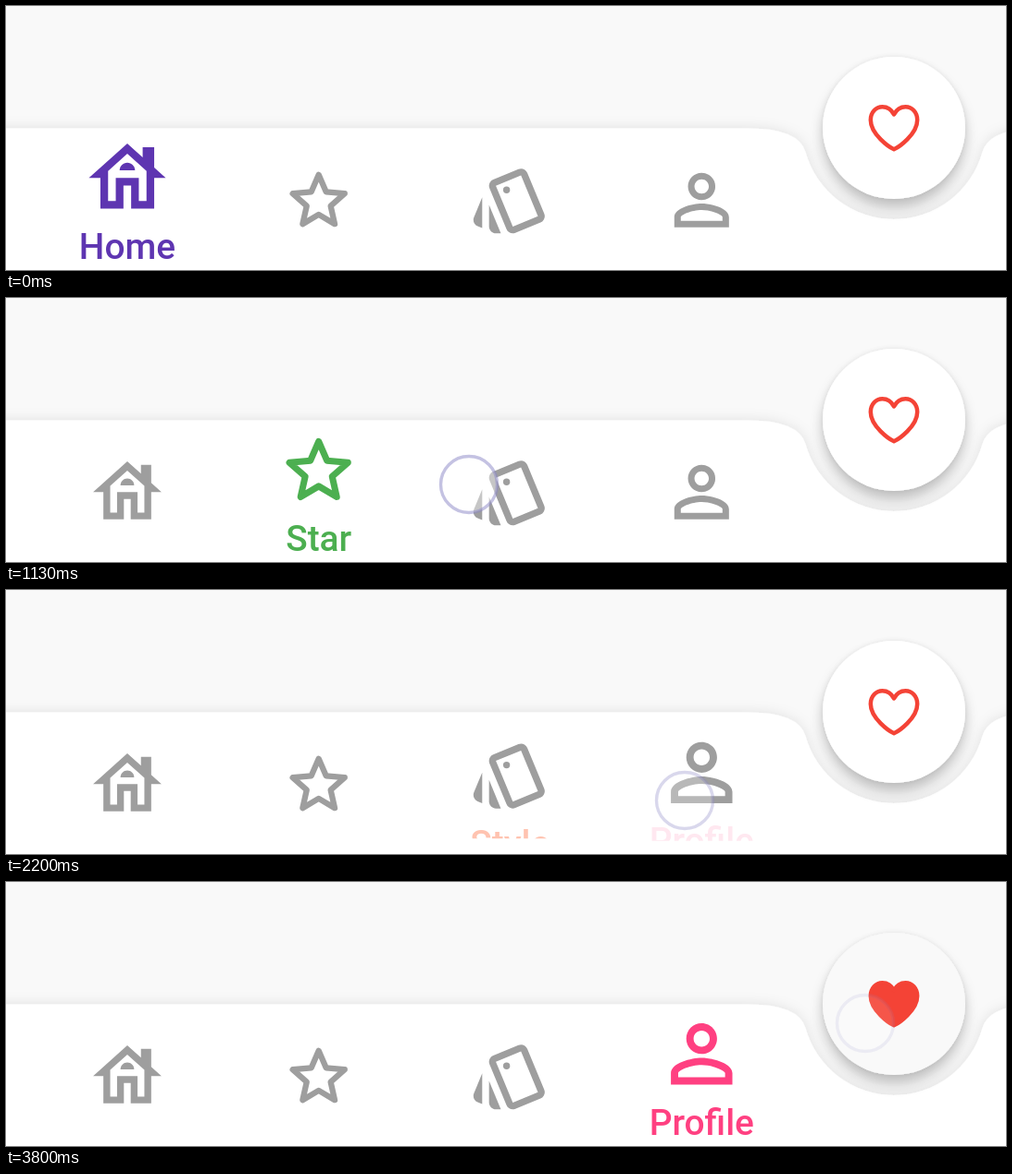
Write an HTML page that moves like this. It is 1080 px wide and 286 px high and loops after 3.87 s.

```html
<!DOCTYPE html>
<html lang="en">
<head>
<meta charset="utf-8">
<title>Bottom navigation bar</title>
<style>
  /* lift, label alpha, icon tint and icon size, each 0 to 1 */
  @property --lift  { syntax: "<number>"; inherits: true; initial-value: 0; }
  @property --alpha { syntax: "<number>"; inherits: true; initial-value: 0; }
  @property --tint  { syntax: "<number>"; inherits: true; initial-value: 0; }
  @property --big   { syntax: "<number>"; inherits: true; initial-value: 0; }

  html, body { margin: 0; width: 100%; height: 100%; overflow: hidden; background: #f9f9f9; }
  svg { display: block; width: 1080px; height: 286px; }

  .item, .heart, .fab, .ring, .ring circle { animation: 3870ms linear infinite; }

  .icon {
    fill: color-mix(in srgb, var(--hue) calc(var(--tint) * 100%), #9e9e9e);
    transform: translateY(calc(210.3px - 24px * var(--lift)))
               scale(calc(3.69 + .46 * var(--big)))
               translate(-12px, -12px);
  }
  .icon .line {
    fill: none;
    stroke: color-mix(in srgb, var(--hue) calc(var(--tint) * 100%), #9e9e9e);
    stroke-width: 1.7;
    stroke-linejoin: round;
  }
  .label {
    font: 500 38.8px Roboto, sans-serif;
    text-anchor: middle;
    fill: var(--hue);
    opacity: var(--alpha);
    transform: translateY(calc(23px * (1 - var(--lift))));
    clip-path: inset(0 -4px calc(46px * (1 - var(--lift))) -4px);
  }

  .home    { --hue: #5e35b1; animation-name: home; }
  .star    { --hue: #4caf50; animation-name: star; }
  .style   { --hue: #ff6e40; animation-name: style; }
  .profile { --hue: #ff4081; animation-name: profile; }

  @keyframes home {
    0%     { --lift: 1; --alpha: 1; --tint: 1; --big: 1; }
    3.36%  { --lift: 1; --alpha: 1; --tint: 1; --big: 1; animation-timing-function: cubic-bezier(.33, 1, .68, 1); }
    3.38%  { --alpha: 1; --tint: 0; --big: 0; }
    6.46%  { --alpha: 0; }
    10.34% { --lift: 0; }
    100%   { --lift: 0; --alpha: 0; --tint: 0; --big: 0; }
  }
  @keyframes star {
    0%     { --lift: 0; --alpha: 0; --tint: 0; --big: 0; }
    3.36%  { --lift: 0; --big: 0; animation-timing-function: cubic-bezier(.33, 1, .68, 1); }
    3.38%  { --big: 1; }
    4.26%  { --alpha: 0; }
    7.62%  { --tint: 0; }
    11.89% { --lift: 1; --alpha: 1; }
    20.54% { --tint: 1; }
    29.46% { --lift: 1; --alpha: 1; --tint: 1; --big: 1; animation-timing-function: cubic-bezier(.33, 1, .68, 1); }
    29.48% { --alpha: 1; --tint: 0; --big: 0; }
    32.56% { --alpha: 0; }
    36.43% { --lift: 0; }
    100%   { --lift: 0; --alpha: 0; --tint: 0; --big: 0; }
  }
  @keyframes style {
    0%     { --lift: 0; --alpha: 0; --tint: 0; --big: 0; }
    29.46% { --lift: 0; --big: 0; animation-timing-function: cubic-bezier(.33, 1, .68, 1); }
    29.48% { --big: 1; }
    30.36% { --alpha: 0; }
    33.72% { --tint: 0; }
    37.98% { --lift: 1; --alpha: 1; }
    46.64% { --tint: 1; }
    55.04% { --lift: 1; --alpha: 1; --tint: 1; --big: 1; animation-timing-function: cubic-bezier(.33, 1, .68, 1); }
    55.06% { --alpha: 1; --tint: 0; --big: 0; }
    58.14% { --alpha: 0; }
    62.02% { --lift: 0; }
    100%   { --lift: 0; --alpha: 0; --tint: 0; --big: 0; }
  }
  @keyframes profile {
    0%     { --lift: 0; --alpha: 0; --tint: 0; --big: 0; }
    55.04% { --lift: 0; --big: 0; animation-timing-function: cubic-bezier(.33, 1, .68, 1); }
    55.06% { --big: 1; }
    55.94% { --alpha: 0; }
    59.3%  { --tint: 0; }
    63.57% { --lift: 1; --alpha: 1; }
    72.22% { --tint: 1; }
    100%   { --lift: 1; --alpha: 1; --tint: 1; --big: 1; }
  }

  .fab { fill: #fff; animation-name: press; }
  @keyframes press {
    0%, 93.02%   { fill: #fff; }
    96.38%, 100% { fill: #f9f9f9; }
  }

  .heart {
    fill: #f44336;
    stroke: #f44336;
    stroke-width: 4.5;
    stroke-linejoin: round;
    animation-name: like;
  }
  @keyframes like {
    0%, 96.37%   { fill-opacity: 0; }
    96.38%, 100% { fill-opacity: 1; }
  }

  .ring { animation-name: move; }
  .ring circle {
    fill: rgba(255, 255, 255, .42);
    stroke: rgba(143, 139, 200, .52);
    stroke-width: 3.4;
    filter: blur(.6px);
    animation-name: touch;
  }
  @keyframes move {
    0%, 10.85%      { transform: translate(344px, 206px); }
    21.96%          { transform: translate(400px, 204px); animation-timing-function: ease-out; }
    27.65%, 34.37%  { transform: translate(500px, 202px); }
    43.93%          { transform: translate(600px, 214px); animation-timing-function: ease-out; }
    49.87%, 60.21%  { transform: translate(733px, 228px); }
    82.69%          { transform: translate(772px, 205px); animation-timing-function: ease-in-out; }
    90.44%          { transform: translate(940px, 145px); animation-timing-function: ease-in-out; }
    93.02%, 100%    { transform: translate(928px, 153px); }
  }
  @keyframes touch {
    0%, 1.81%       { opacity: 0; }
    3.62%, 5.17%    { opacity: 1; }
    8.53%           { opacity: .65; }
    10.85%, 21.96%  { opacity: 0; }
    25.84%, 29.46%  { opacity: 1; }
    34.37%, 43.93%  { opacity: 0; }
    47.29%, 55.04%  { opacity: 1; }
    56.85%          { opacity: .65; }
    60.21%, 82.69%  { opacity: 0; }
    86.05%, 94.83%  { opacity: 1; }
    98.19%          { opacity: .25; }
    100%            { opacity: 0; }
  }
</style>
</head>
<body>
<svg viewBox="0 0 1080 286">
  <defs>
    <filter id="barShade" filterUnits="userSpaceOnUse" x="-60" y="60" width="1260" height="320">
      <feDropShadow dx="0" dy="0" stdDeviation="7" flood-color="#000" flood-opacity=".1"/>
    </filter>
    <filter id="fabShade" filterUnits="userSpaceOnUse" x="820" y="0" width="280" height="286">
      <feDropShadow dx="0" dy="10" stdDeviation="7" flood-color="#000" flood-opacity=".21"/>
    </filter>
    <filter id="rimShade" filterUnits="userSpaceOnUse" x="820" y="0" width="280" height="286">
      <feDropShadow dx="0" dy="0" stdDeviation="2.5" flood-color="#000" flood-opacity=".08"/>
    </filter>
  </defs>

  <rect width="1080" height="286" fill="#f9f9f9"/>
  <path fill="#fff" filter="url(#barShade)"
    d="M-40 132.5H801Q856.3 132.5 863.6 158.4A99 99 0 0 0 1054.4 158.4Q1061.7 132.5 1117 132.5H1160V340H-40Z"/>

  <g transform="translate(131 0)">
    <g class="item home">
      <g class="icon">
        <path d="M19 9.3V4h-3v2.6L12 3 2 12h3v8h6v-6h2v6h6v-8h3l-3-2.7zM17 18h-2v-6H9v6H7v-7.81l5-4.5 5 4.5V18z"/>
        <path d="M10 10h4c0-1.1-.9-2-2-2s-2 .9-2 2z"/>
      </g>
      <text class="label" y="274">Home</text>
    </g>
  </g>

  <g transform="translate(337.7 0)">
    <g class="item star">
      <g class="icon">
        <path class="line" d="M12 4.55L14.16 9.57 19.61 10.08 15.5 13.69 16.7 19.02 12 16.23 7.3 19.02 8.5 13.69 4.39 10.08 9.84 9.57Z"/>
      </g>
      <text class="label" y="274">Star</text>
    </g>
  </g>

  <g transform="translate(544.3 0)">
    <g class="item style">
      <g class="icon">
        <path d="M2.53 19.65l1.34.56v-9.03l-2.43 5.86c-.41 1.02.08 2.19 1.09 2.61zm19.5-3.7L17.07 3.98c-.31-.75-1.04-1.21-1.81-1.23-.26 0-.53.04-.79.15L7.1 5.95c-.75.31-1.21 1.03-1.23 1.8-.01.27.04.54.15.8l4.96 11.97c.31.76 1.05 1.22 1.83 1.23.26 0 .52-.05.77-.15l7.36-3.05c1.02-.42 1.51-1.59 1.09-2.6zm-9.2 3.8L7.87 7.79l7.35-3.04h.01l4.95 11.95-7.35 3.05z"/>
        <circle cx="11" cy="9" r="1"/>
        <path d="M5.88 19.75c0 1.1.9 2 2 2h1.45l-3.45-8.34v6.34z"/>
      </g>
      <text class="label" y="274">Style</text>
    </g>
  </g>

  <g transform="translate(751.3 0)">
    <g class="item profile">
      <g class="icon">
        <path d="M12 5.9c1.16 0 2.1.94 2.1 2.1s-.94 2.1-2.1 2.1S9.9 9.16 9.9 8s.94-2.1 2.1-2.1m0 9c2.97 0 6.1 1.46 6.1 2.1v1.1H5.9V17c0-.64 3.13-2.1 6.1-2.1M12 4C9.79 4 8 5.79 8 8s1.79 4 4 4 4-1.79 4-4-1.79-4-4-4zm0 9c-2.67 0-8 1.34-8 4v3h16v-3c0-2.66-5.33-4-8-4z"/>
      </g>
      <text class="label" y="274">Profile</text>
    </g>
  </g>

  <g filter="url(#rimShade)">
    <circle class="fab" cx="959" cy="132" r="77" filter="url(#fabShade)"/>
  </g>
  <path class="heart" d="M959 155.2C954 153 933.8 139 933.8 123.5C933.8 115 939.5 109.2 946.5 109.2C952 109.2 956.5 112.5 959 117.5C961.5 112.5 966 109.2 971.5 109.2C978.5 109.2 984.2 115 984.2 123.5C984.2 139 964 153 959 155.2Z"/>

  <g class="ring"><circle r="30.5"/></g>
</svg>
</body>
</html>
```
